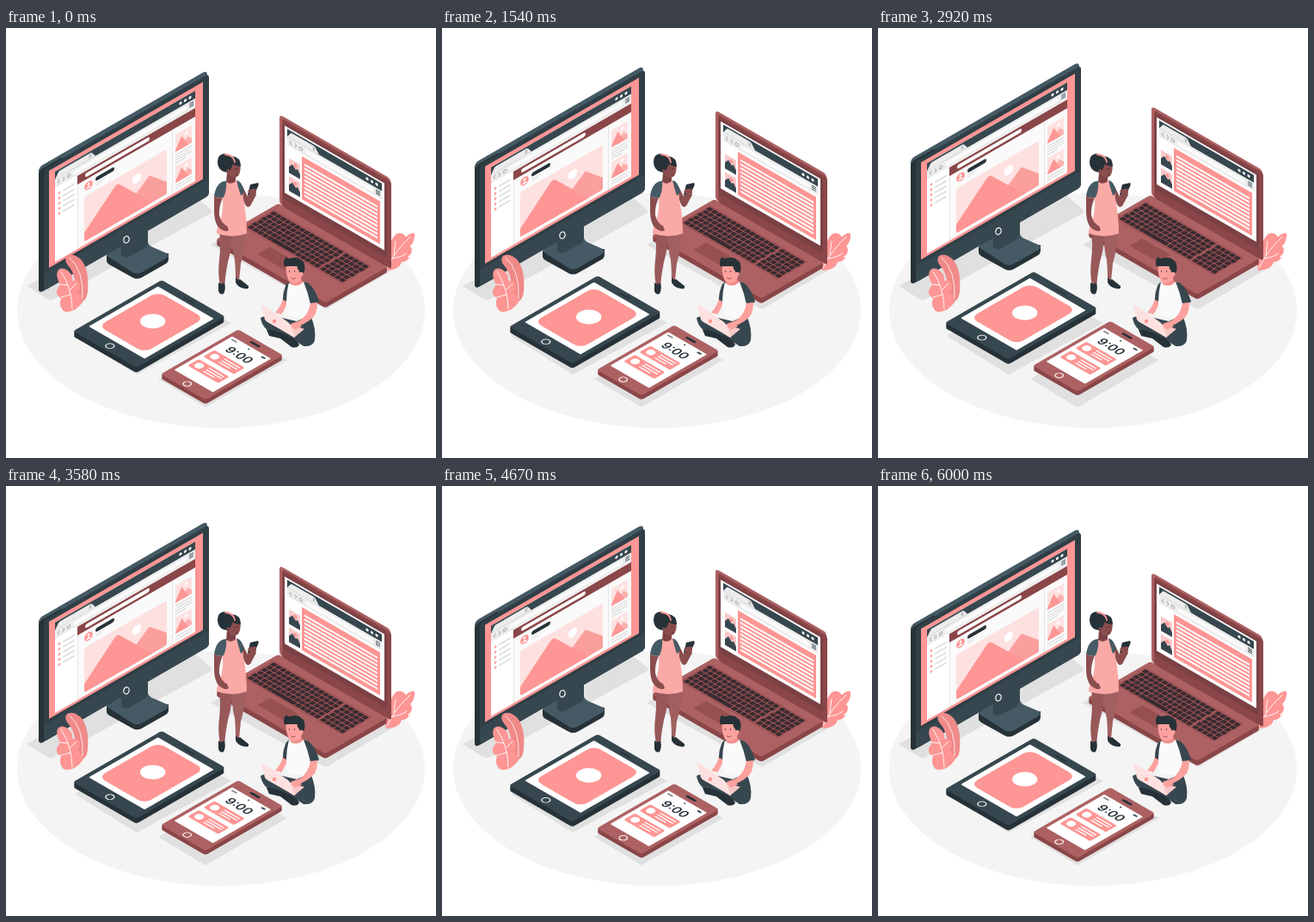
Animation of 500x500 px, one loop 6040 ms. Source, as an HTML page:

```html
<!DOCTYPE html>
<html lang="en">
<head>
<meta charset="utf-8">
<title>Floating devices</title>
<style>
html, body { margin: 0; width: 100%; height: 100%; overflow: hidden; background: #fff; }
svg { display: block; width: 100%; height: 100%; }
</style>
</head>
<body>
<svg id="stage" viewBox="0 0 500 500"></svg>
<script>
const LOOP = 6040, RISE = 3000, LIFT = 10, STEP = 40;
const pink = '#fd9694', pale = '#fde1e0', white = '#fafafa', grey = '#e0e0e0';
const ink = '#263238', slate = '#37474f', steel = '#455a64';
const maroon = '#ad6163', wine = '#8a4648', bezel = '#7b4144', skin = '#8b4d4e', fair = '#fca19e';

const rect = (x, y, w, h, fill, r = 0) =>
  `<rect x="${x}" y="${y}" width="${w}" height="${h}" rx="${r}" fill="${fill}"/>`;
const dot = (x, y, r, fill) => `<circle cx="${x}" cy="${y}" r="${r}" fill="${fill}"/>`;
const ring = (x, y, r, w = 1.2) =>
  `<circle cx="${x}" cy="${y}" r="${r}" fill="none" stroke="#fff" stroke-width="${w}"/>`;
const path = (d, fill) => `<path d="${d}" fill="${fill}"/>`;
const line = (d, color, w = 1) =>
  `<path d="${d}" fill="none" stroke="${color}" stroke-width="${w}" stroke-linecap="round" stroke-linejoin="round"/>`;
const matrix = (m, body) => `<g transform="matrix(${m})">${body}</g>`;
const wallLeft = (x, y, body) => matrix(`1,-.577,0,1,${x},${y}`, body);
const wallRight = (x, y, body) => matrix(`1,.577,0,1,${x},${y}`, body);
const floor = (x, y, body) => matrix(`.866,-.5,.866,.5,${x},${y}`, body);
const many = (n, draw) => Array.from({ length: n }, (_, i) => draw(i)).join('');

function slab(x, y, w, h, r, depth, side, top, body) {
  return many(depth + 1, i => floor(x, y + depth - i, rect(0, 0, w, h, i < depth ? side : top, r))) +
    floor(x, y, body);
}

function picture(x, y, w, h) {
  const b = y + h;
  return rect(x, y, w, h, pale, 1) +
    path(`M${x + w * .3} ${b}L${x + w * .74} ${y + h * .5}L${x + w} ${y + h * .78}V${b}Z`, '#fbb0ae') +
    path(`M${x} ${b}V${b - h * .08}L${x + w * .38} ${y + h * .28}L${x + w * .8} ${b}Z`, pink) +
    dot(x + w * .66, y + h * .26, w * .09, '#fff');
}

function browserTop(x, y, w, tab) {
  return rect(x, y, w, 9, slate) + rect(x, y + 9, w, 10, '#ececec') +
    path(`M${x} ${y + 9}l4 -6q1 -1 2 -1h${tab - 10}q2 0 3 1l4 6z`, '#ececec') +
    many(3, i => dot(x + w - 17 + i * 5.5, y + 4.6, 1.6, '#fff')) +
    line(`M${x + 5} ${y + 12}l-2 2l2 2M${x + 9} ${y + 12}l2 2l-2 2`, '#999', .7) +
    `<circle cx="${x + 16}" cy="${y + 14}" r="1.8" fill="none" stroke="#999" stroke-width=".7"/>` +
    line(`M${x + tab - 4} ${y + 4}l2 3m0 -3l-2 3`, '#888', .6) +
    rect(x + 21, y + 11.5, w - 31, 5, white, 2) +
    many(3, i => rect(x + w - 7, y + 11 + i * 2, 5, .9, slate));
}

function monitor() {
  const stand =
    path('M117 264V271Q117 273 120 275L147 290Q152 293 158 290L186 274Q189 272 189 268V262Z', ink) +
    path('M119 266Q115 263 120 260L147 245L165 236V249Q166 253 171 255L187 262Q191 265 186 268L158 284Q152 287 147 284Z', steel) +
    path('M134 243L165 228V249Q165 253 161 256L143 266Q139 268 134 265Z', slate);
  const page =
    rect(0, 0, 179, 113, pink) + rect(7, 5, 163, 105, white) + browserTop(7, 5, 163, 44) +
    rect(7, 24, 26, 86, '#fff') + rect(33, 25, .8, 85, grey) +
    rect(33, 25, 137, 10, wine) + rect(42, 27.6, 75, 4.6, white, 2.3) +
    many(5, i => dot(12, 32.5 + i * 6, 1.4, pink) + rect(16, 31.4 + i * 6, 14, 2.2, grey, 1)) +
    dot(46, 43.5, 4.8, pink) + dot(46, 41.8, 1.5, '#fff') + path('M43 46.6q3 -5 6 0z', '#fff') +
    rect(54, 39, 22, 4.6, ink, 2.3) + rect(54, 45.3, 11, 1.1, grey) + rect(54, 47.7, 8, 1.1, grey) +
    rect(41, 54, 96, 52, pale, 2) +
    path('M90 106L99 87L114 75Q117 72 119 75L137 92V104Q137 106 135 106Z', '#fb9f9d') +
    path('M41 104V96L76 63Q79 60 82 63L120 106H43Q41 106 41 104Z', pink) +
    dot(102, 68, 5.2, '#fff') + rect(143, 35, .8, 75, grey) +
    picture(147, 43, 19, 20) + picture(147, 80, 19, 19) +
    many(4, i => rect(147, 66 + i * 3.2, i === 3 ? 12 : 19, 1.2, '#d8d8d8')) +
    many(2, i => rect(147, 102 + i * 3.2, 19, 1.2, '#d8d8d8'));
  return stand + wallLeft(50, 166,
    rect(-12, -11, 196, 146, steel, 5) + rect(-12, -7, 30, 143, ink, 5) +
    rect(-6, -5.5, 192, 141.5, '#303e46', 4) +
    path('M-6 117H186V132Q186 136 182 136H-2Q-6 136 -6 132Z', slate) + page) +
    `<ellipse cx="140" cy="246" rx="3.1" ry="4" fill="none" stroke="#fff" stroke-width="1.2" transform="rotate(15 140 246)"/>`;
}

function laptop() {
  const keyColor = '#382b30';
  const keys = many(6, row => {
    const u = 66.5 - row * 6.2, stagger = row % 2 * .8;
    return many(20, i => row === 5 && i > 4 && i < 10 ? '' :
      rect(u, 6 + i * 6.35 + stagger + (i > 14 ? 2 : 0), 5.1, 5.4, keyColor, .8)) +
      (row === 5 ? rect(u, 38, 5.1, 31, keyColor, .8) : '');
  });
  const thumb = y => rect(11, y, 13, 17, '#f8c9c8') + dot(18.5, y + 4.5, 2.1, pink) +
    path(`M11 ${y + 17}V${y + 10}L15 ${y + 5}L19 ${y + 9}L21 ${y + 7}L24 ${y + 12}V${y + 17}Z`, slate);
  const screen =
    rect(6, 8, 116, 78, '#fff') + browserTop(9, 10, 110, 34) +
    rect(26, 32, 91, 50, pink) + many(9, i => rect(29, 39 + i * 4.5, 85, 2.2, '#fff')) +
    thumb(43) + thumb(64);
  return slab(244, 246, 84, 147, 3, 6, wine, maroon,
      rect(33, 4, 41, 132, '#a05557', 2) + keys + rect(11, 45, 17, 38, '#96514f', 1)) +
    wallRight(318, 102,
      rect(0, -1.5, 129, 104, maroon, 4) + rect(3, 1.5, 127, 102, wine, 3) +
      rect(4, 5, 121, 88, bezel, 2) + screen);
}

// The app marks are reduced to plain circles.
function tablet() {
  return slab(78, 352.5, 119, 85, 3, 6, ink, slate,
    rect(16, 5, 93, 75, '#fff', 1) + rect(23, 11, 80, 62, pink, 9) +
    dot(65, 42, 12, '#fff') + ring(7.5, 42, 4) + rect(112.5, 35, 1.8, 14, ink, .9));
}

function phone() {
  const card = u => rect(u, 8, 15, 41, pink, 2) + dot(u + 7.5, 16, 4.6, '#fff') +
    many(3, i => rect(u + 10.5 - i * 3.6, 25, 1.5, i === 2 ? 15 : 21, '#fff', .7));
  return slab(180, 402.5, 104, 60, 3, 5, wine, maroon,
    rect(14, 4, 78, 52, '#fff', 1) + card(49) + card(28) +
    `<text transform="matrix(0,1,-1,0,70,30.5)" text-anchor="middle" font-family="Inter,Arial,sans-serif" font-size="14" font-weight="600" fill="${ink}">9:00</text>` +
    rect(87, 7, 2, 7, '#888', .5) + dot(88, 30, 1, slate) + rect(87, 47, 2.2, 5, slate, .5) +
    ring(6.5, 29, 3.8) + rect(96.5, 22, 3, 13, ink, 1.5));
}

function shadows() {
  return path('M24 300L213 196Q217 194 221 196L238 211Q241 214 237 216L56 315Q52 317 48 315Z', grey) +
    path('M80 358L181 297L262 343L152 403Z', grey) +
    path('M177 408L270 356L327 386L232 441Z', grey) +
    path('M238 252L318 206L452 280L372 327Z', grey);
}

function rightPlant() {
  return path('M442 282Q439 268 445 262Q446 247 453 240Q460 236 465 243Q471 237 475 239Q476 247 470 254Q474 257 470 264Q465 266 469 267Q466 272 460 272Q458 281 442 282Z', pink) +
    line('M443 279Q453 258 470 243M451 264L453 248M449 268Q459 267 466 262', '#fff', .9);
}

function leftPlant() {
  return path('M81 320Q94 320 95 306Q97 280 87 269Q78 261 71 265Q67 269 72 276Q84 289 81 320Z', '#ef8a88') +
    line('M74 267Q91 282 89 315', '#fff', .8) +
    path('M66 328Q61 322 64 314Q56 310 60 303Q63 300 62 297Q57 286 61 281Q66 277 73 283Q78 288 77 294Q84 292 86 299Q86 304 82 307Q90 311 89 319Q82 329 72 330Q67 330 66 328Z', pink) +
    line('M64 283Q77 303 77 327M72 299L62 298M75 310L64 313M75 304L82 297', '#fff', .9);
}

function woman() {
  return path('M248 236H263Q263 256 258 272Q255 287 254 300H249Q246 284 248 270Q250 252 248 236Z', '#985859') +
    path('M263 236H279Q278 257 273 274L271 294L267 293Q267 281 266 270Q262 254 263 236Z', '#a06060') +
    path('M247 296Q251 299 254 296Q256 304 253 309Q249 311 247 306Z', ink) +
    path('M267 290Q270 294 272 292L282 300Q283 304 278 303Q270 302 267 296Z', ink) +
    path('M271 190L278 205Q280 210 284 207L291 194L288 188L282 191L281 196L276 186Z', skin) +
    path('M255 179Q263 181 269 177Q276 187 276 199Q280 220 280 239Q264 245 245 239Q244 235 250 222Q253 210 252 199Z', '#fba9a6') +
    path('M256 178Q245 178 242 195Q247 199 253 197Q257 188 256 178Z', steel) +
    path('M268 177Q275 179 277 190Q276 193 273 195Q270 186 268 177Z', steel) +
    path('M242 195Q247 199 252 197Q247 209 248 218Q251 228 257 230L259 235Q256 238 250 234Q242 229 242 212Z', skin) +
    path('M284 182L293 180Q294 181 293.5 183L290 191Q289 193 287 193L281 194Z', ink) +
    path('M281 190Q284 186 291 187L291 192L285 195Z', skin) +
    path('M257 168H267L267 178Q262 183 256 179Z', '#7c4244') +
    path('M257 158Q264 152 272 157Q274 166 270 172Q266 176 260 172Q255 166 257 158Z', skin) +
    path('M246 155Q246 147 254 146Q260 147 263 149Q273 150 273 161Q267 161 264 158Q262 164 258 168Q246 167 246 155Z', ink) +
    line('M255 147Q265 148 266 156', pink, 1.8) + dot(258, 166, 1.7, skin) +
    line('M267 164l2 -.4M267 171q2 0 2 -1', '#4c282a', .8);
}

function man() {
  const head =
    path('M324 277Q333 271 342 278Q345 286 340 293Q333 298 328 294Q324 287 324 277Z', fair) +
    path('M322 276Q320 268 325 265Q325 267 328 267Q338 264 342 269Q346 270 346 279Q345 286 342 287L339 281Q337 279 337 276Q330 276 322 276Z', ink) +
    dot(342, 285, 2.3, fair) + dot(328, 282, .7, ink) + dot(334, 282, .7, ink) +
    line('M330 290Q332 292 335 290', '#8f4648', .8);
  return path('M296 337Q303 333 312 335L338 341L354 334Q361 350 359 363Q357 371 346 370L337 364L314 357Q298 351 296 337Z', slate) +
    path('M303 351Q312 350 326 357Q338 362 341 368Q339 373 332 371L319 361L306 358Z', ink) +
    path('M322 314L328 315Q325 327 320 333L313 331Q321 322 322 314Z', fair) +
    path('M327 297L348 295Q356 305 356 322L353 335Q340 339 328 334Q326 316 324 306Z', white) +
    path('M329 295L326 298Q322 306 322 316L326 318Q326 307 329 295Z', slate) +
    path('M346 295Q357 296 364 318Q360 322 354 321Q351 307 346 295Z', slate) +
    path('M354 320L362 319Q362 328 359 334Q354 341 340 347L332 350L331 344L342 340Q352 333 354 320Z', fair) +
    path('M331 290L342 288L345 296Q339 302 331 298Z', '#f28f8c') +
    `<g transform="translate(1.5 1)">${head}</g>` +
    path('M308 343L331 345L347 350L335 360Z', '#f6c9c7') +
    path('M297 323Q298 322 300 323L328 342Q330 344 331 346L336 360L304 342Q302 341 301 339Z', pale) +
    dot(312, 341, 2.2, pink) + path('M331 346L341 344L344 347L336 351Z', fair);
}

const stage = document.getElementById('stage');
stage.innerHTML =
  `<ellipse cx="250" cy="328.5" rx="237" ry="136.5" fill="#f4f4f4"/>` +
  shadows() + rightPlant() +
  `<g id="devices">${monitor()}${laptop()}${tablet()}${phone()}</g>` +
  leftPlant() + woman() + man();

const devices = document.getElementById('devices');

function render(ms) {
  const t = Math.floor((ms % LOOP) / STEP) * STEP;
  const lift = LIFT * Math.max(0, 1 - Math.abs(t - RISE) / RISE);
  devices.setAttribute('transform', `translate(0 ${-lift.toFixed(3)})`);
}

const start = performance.now();
function tick() {
  render(performance.now() - start);
  requestAnimationFrame(tick);
}
tick();
</script>
</body>
</html>
```
